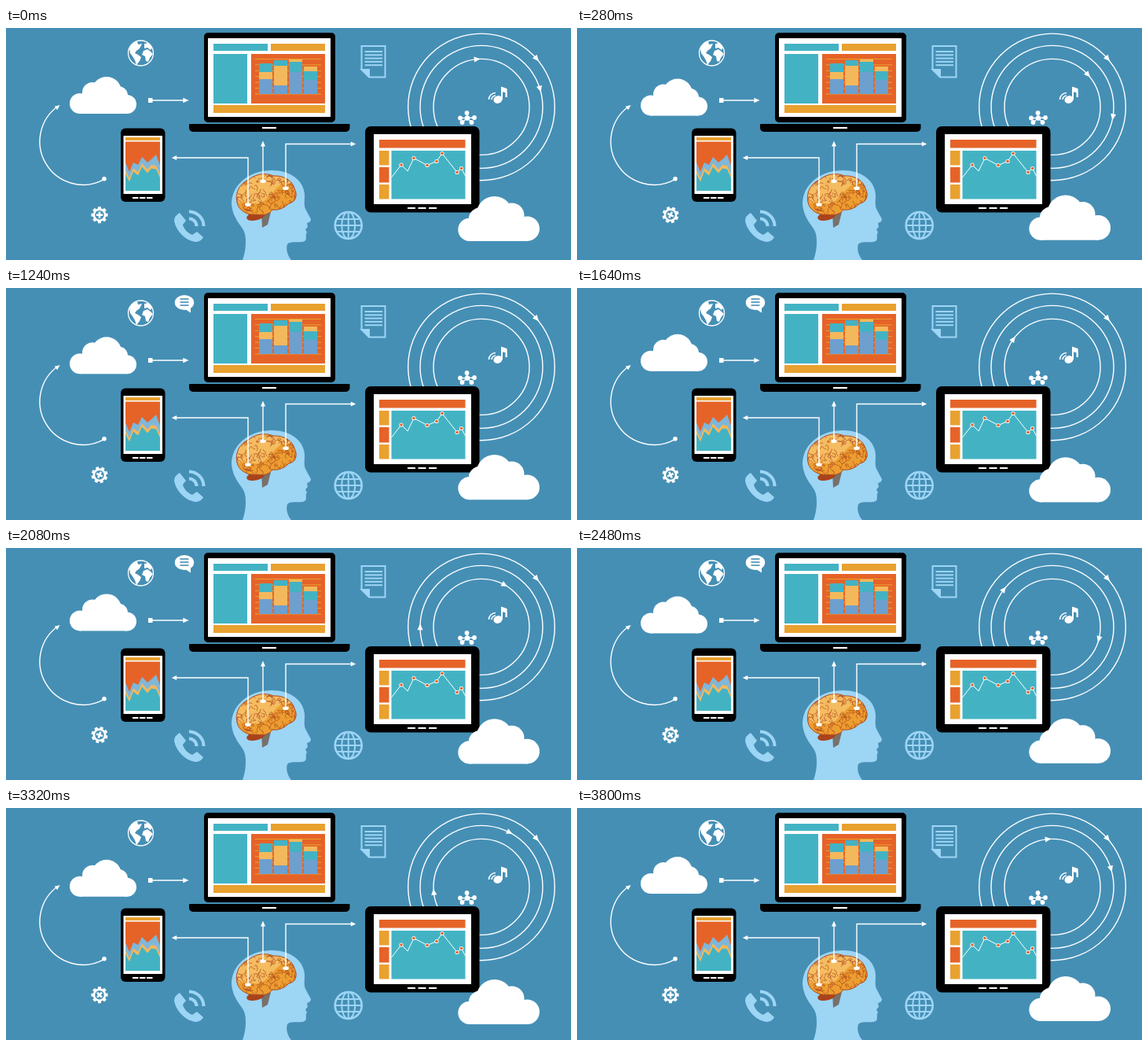
Write an HTML page with a canvas that moves like this. It is 719 px wide and 295 px high and loops after 3.84 s.

```html
<!DOCTYPE html>
<html lang="en">
<head>
<meta charset="utf-8">
<title>Connected devices</title>
<style>
html, body { margin: 0; width: 719px; height: 295px; overflow: hidden; background: #458fb5; }
canvas { display: block; }
</style>
</head>
<body>
<canvas id="stage" width="719" height="295"></canvas>
<script>
const ctx = document.getElementById('stage').getContext('2d');
const LOOP = 3840, TURN = 3800, TAU = Math.PI * 2;
const BG = '#458fb5', PALE = '#9dd5f5', TEAL = '#43b3c4', ORANGE = '#e66328',
  YELLOW = '#e9a12f', SAND = '#f3b85b', BLUE = '#6d9fcf', WHITE = '#fff', BLACK = '#000';

function box(color, x0, y0, x1, y1) {
  ctx.fillStyle = color;
  ctx.fillRect(x0, y0, x1 - x0, y1 - y0);
}
function roundBox(color, x0, y0, x1, y1, r) {
  ctx.fillStyle = color;
  ctx.beginPath();
  ctx.roundRect(x0, y0, x1 - x0, y1 - y0, r);
  ctx.fill();
}
function oval(color, x, y, rx, ry = rx, tilt = 0) {
  ctx.fillStyle = color;
  ctx.beginPath();
  ctx.ellipse(x, y, rx, ry, tilt, 0, TAU);
  ctx.fill();
}
function arc(color, width, x, y, r, a = 0, b = TAU) {
  ctx.strokeStyle = color;
  ctx.lineWidth = width;
  ctx.beginPath();
  ctx.arc(x, y, r, a, b);
  ctx.stroke();
}
function line(color, width, points) {
  ctx.strokeStyle = color;
  ctx.lineWidth = width;
  ctx.beginPath();
  points.forEach(p => ctx.lineTo(...p));
  ctx.stroke();
}
function poly(color, points) {
  ctx.fillStyle = color;
  ctx.beginPath();
  points.forEach(p => ctx.lineTo(...p));
  ctx.fill();
}
function shape(color, path) {
  ctx.fillStyle = color;
  ctx.fill(path);
}
// Triangle centred at x, y and pointing along the angle
function arrow(x, y, angle, size = 4) {
  ctx.save();
  ctx.translate(x, y);
  ctx.rotate(angle);
  poly(WHITE, [[size, 0], [-size, -size * .9], [-size, size * .9]]);
  ctx.restore();
}

function cloud(x, y, sx, sy) {
  ctx.save();
  ctx.translate(x, y);
  ctx.scale(sx, sy);
  oval(WHITE, 13, -13, 13);
  oval(WHITE, 29, -27, 13);
  oval(WHITE, 47, -28, 19);
  oval(WHITE, 62, -23, 12);
  oval(WHITE, 73, -12, 12);
  box(WHITE, 13, -22, 73, 0);
  ctx.restore();
}

function rings(turn) {
  const cx = 605, cy = 100.4;
  const ring = (r, degrees) => {
    const a = (degrees - 90) * Math.PI / 180;
    arc(WHITE, 1.4, cx, cy, r);
    arrow(cx + r * Math.cos(a), cy + r * Math.sin(a), a + Math.PI / 2);
  };
  ring(93.3, 49);
  ring(78, 73 + 360 * turn);
  ring(61, -5 + 720 * turn);
}

function laptop() {
  roundBox(BLACK, 252, 6, 419, 120, 5);
  box(WHITE, 257, 13, 413, 113);
  box(TEAL, 264, 20, 333, 29);
  box(YELLOW, 337, 20, 406, 29);
  box(TEAL, 264, 33, 307, 96);
  box(ORANGE, 312, 33, 406, 96);
  box(YELLOW, 264, 98, 406, 108);
  for (let i = 0; i < 7; i++) box(YELLOW, 317, 39 + i * 7.4, 401, 40 + i * 7.4);
  const bars = [
    [[TEAL, 45], [SAND, 56], [BLUE, 65]],
    [[TEAL, 41], [SAND, 48], [BLUE, 73]],
    [[SAND, 40], [TEAL, 43], [BLUE, 56]],
    [[SAND, 49], [TEAL, 55], [BLUE, 66]]
  ];
  bars.forEach((parts, i) => parts.forEach(([color, top]) =>
    box(color, 322 + i * 19, top, 339 + i * 19, 84)));
  roundBox(BLACK, 233, 122, 437.5, 132, [1, 1, 5, 5]);
  box(WHITE, 326, 126, 344, 128);
}

function phone() {
  roundBox(BLACK, 146, 127.5, 202.5, 221, 6);
  box(WHITE, 149.5, 137, 199, 211);
  box(YELLOW, 152, 139, 196, 143);
  box(ORANGE, 152, 144.5, 196, 207);
  const xs = [152, 157, 162, 168, 173, 180, 185, 191, 196];
  const area = (color, ys, dy = 0) => poly(color,
    [[152, 207], ...xs.map((x, i) => [x, ys[i] + dy]), [196, 207]]);
  const low = [181, 191, 178, 183, 172, 180, 174, 175, 186];
  area('#7fb7d9', [171, 183, 171, 174, 164, 171, 167, 161, 175]);
  area(SAND, low);
  area(TEAL, low, 4.5);
  for (const x of [161, 170, 179]) box(WHITE, x, 215, x + 7.5, 217);
}

function tablet() {
  roundBox(BLACK, 457, 125, 602.5, 234.5, 7);
  box(WHITE, 468, 135, 592, 224);
  box(ORANGE, 475, 142, 584.5, 152.5);
  box(YELLOW, 475, 156, 487.5, 174.5);
  box(ORANGE, 475, 177, 487.5, 196.5);
  box(YELLOW, 475, 199, 487.5, 217.5);
  box(TEAL, 490.5, 156, 584.5, 217.5);
  const data = [[490.5, 190], [503, 174], [511, 182], [519, 165.5], [536, 174.5],
    [548, 169.5], [555, 159.5], [574, 183.5], [579.5, 178.5], [584.5, 188]];
  line(WHITE, 1, data);
  data.forEach(([x, y], i) => {
    if (i % 9 === 0 || i === 2) return;
    oval(WHITE, x, y, 2.6);
    oval(ORANGE, x, y, 1.8);
  });
  for (const x of [511, 524.5, 538]) box(WHITE, x, 228, x + 10, 230);
}

const head = new Path2D(`M301 295 C305 284 306 272 304 262 C302 252 289 245 287 224
  C287 198 311 181 338 181 C362 181 379 194 380 212 C380 221 379 225 381 230
  L388 243 Q388 247 383 248 L384 253 L381 256 L383 260 C380 263 384 269 380 271
  C374 274 362 270 358 275 C356 281 358 289 363 295 Z`);
const brain = new Path2D(`M294 222 C291 209 298 197 309 193 C317 185 332 184 340 188
  C354 187 365 195 367 204 C372 213 368 222 360 223 C354 229 347 232 339 231
  C335 237 327 239 319 237 C308 239 296 232 294 222 Z`);
const lowerBrain = new Path2D(`M294 224 C305 216 316 228 327 221 C339 212 343 201 355 197
  L375 202 L370 224 L340 240 L300 240 Z`);

function makeFolds() {
  let seed = 17;
  const random = () => (seed = seed * 16807 % 2147483647) / 2147483647;
  const path = new Path2D();
  for (let i = 0; i < 120; i++) {
    let x = 294 + random() * 75, y = 187 + random() * 51, a = random() * TAU;
    path.moveTo(x, y);
    for (let k = 0; k < 3; k++) {
      a += (random() - .5) * 3.4;
      const mx = x + 2 * Math.cos(a), my = y + 2 * Math.sin(a);
      a += (random() - .5) * 3.4;
      x = mx + 2 * Math.cos(a);
      y = my + 2 * Math.sin(a);
      path.quadraticCurveTo(mx, my, x, y);
    }
  }
  return path;
}
const folds = makeFolds();

function headAndBrain() {
  shape(PALE, head);
  poly('#77716b', [[325, 236], [337, 234], [333, 250], [326, 254]]);
  oval('#a9431c', 318, 239, 12, 5.5, -.25);
  shape('#f5bc60', brain);
  ctx.save();
  ctx.clip(brain);
  shape('#ec9e30', lowerBrain);
  ctx.strokeStyle = '#b04a1d';
  ctx.lineWidth = .7;
  ctx.stroke(folds);
  ctx.restore();
  ctx.strokeStyle = '#b04a1d';
  ctx.lineWidth = 1;
  ctx.stroke(brain);
}

function connectors() {
  line(WHITE, 1.4, [[308, 225], [308, 165], [216, 165]]);
  arrow(214, 165, Math.PI, 3.2);
  line(WHITE, 1.4, [[327, 195], [327, 149]]);
  arrow(327, 147, -Math.PI / 2, 3.4);
  line(WHITE, 1.4, [[356, 204], [356, 147.5], [440, 147.5]]);
  arrow(442, 147.5, 0, 3.2);
  for (const [x, y] of [[308, 224.5], [327, 194.7], [356, 203.7]]) oval(WHITE, x, y, 3.8, 2.3);

  box(WHITE, 181, 89, 186.5, 95);
  line(WHITE, 1.4, [[184, 92], [227, 92]]);
  arrow(229, 92, 0, 3.6);
  arc(WHITE, 1.4, 98, 144.3, 55, 1.06, Math.PI + .96);
  oval(WHITE, 125, 191.7, 2.8);
  arrow(66, 100, -.65, 3.2);
}

const continents = new Path2D(`M157 26 L161 20 L167 17 L168 21 L173 20 L170 26 L166 29 L164 32
  L168 34 L172 37 L170 42 L166 47 L164 41 L161 36 L158 32 Z
  M176 20 L181 19 L186 25 L184 28 L180 25 L176 26 Z
  M175 29 L180 27 L184 30 L187 33 L183 38 L181 43 L178 42 L177 36 L173 34 Z`);
const handset = new Path2D(`M221 235 Q214 239 214 245 C216 258 229 271 242 272 Q249 271 251 266
  L243 259 L237 263 C231 261 226 255 225 250 L229 245 Z`);

function icons() {
  arc(WHITE, 1.3, 171.5, 32, 16);
  shape(WHITE, continents);

  shape(PALE, handset);
  arc(PALE, 4, 233, 252, 9.5, -Math.PI / 2, 0);
  arc(PALE, 4, 233, 252, 18.5, -Math.PI / 2, 0);

  // Wire globe
  arc(PALE, 2.6, 435.7, 251, 17);
  ctx.lineWidth = 2;
  ctx.beginPath();
  ctx.ellipse(435.7, 251, 8.5, 17, 0, 0, TAU);
  ctx.stroke();
  line(PALE, 2, [[435.7, 234], [435.7, 268]]);
  for (const [y, half] of [[243, 15], [251, 17], [259, 15]])
    line(PALE, 2, [[435.7 - half, y], [435.7 + half, y]]);

  // Document
  line(PALE, 2, [[452.5, 53], [452.5, 23], [482.5, 23], [482.5, 62.5], [462, 62.5], [452.5, 53], [462, 53], [462, 62.5]]);
  poly(PALE, [[452.5, 53], [462, 53], [462, 62.5]]);
  for (let i = 0; i < 5; i++) line(PALE, 2, [[456.5, 30 + i * 4.3], [479, 30 + i * 4.3]]);

  // Network hub
  for (const [x, y] of [[578, 114.5], [586.5, 108], [596, 114], [592.5, 120], [580.5, 120]]) {
    line(WHITE, 1.4, [[587, 114.5], [x, y]]);
    oval(WHITE, x, y, 2.9);
  }
  oval(WHITE, 587, 114.5, 3.2);

  // Music note
  oval(WHITE, 626, 91, 5.6, 4.8, -.3);
  line(WHITE, 2, [[631, 91], [631, 75]]);
  shape(WHITE, new Path2D('M630 74.5 L637.5 77 L638 88 L635.5 88 L635.5 82 L630 81 Z'));
  arc(WHITE, 1.6, 623, 91, 5, Math.PI, Math.PI * 1.5);
  arc(WHITE, 1.6, 623, 91, 8.5, Math.PI, Math.PI * 1.5);
}

function bubble() {
  oval(WHITE, 227, 18.5, 12.2, 9.6);
  poly(WHITE, [[228, 27], [235, 31.5], [235, 24]]);
  for (const y of [14, 18, 22]) line(BG, 1.6, [[221.5, y], [232.5, y]]);
}

function gear(angle) {
  ctx.save();
  ctx.translate(119, 237.7);
  ctx.rotate(angle);
  for (let i = 0; i < 8; i++) {
    ctx.rotate(TAU / 8);
    box(WHITE, -2, -10.5, 2, -6);
  }
  oval(WHITE, 0, 0, 8.4);
  oval(BG, 0, 0, 5.8);
  box(WHITE, -4.2, -1.3, 4.2, 1.3);
  box(WHITE, -1.3, -4.2, 1.3, 4.2);
  ctx.restore();
}

// Eased interpolation through [time, value] keys
function track(t, keys) {
  const i = Math.max(1, keys.findIndex(k => k[0] >= t));
  const [t0, v0] = keys[i - 1], [t1, v1] = keys[i];
  const p = (t - t0) / (t1 - t0);
  return v0 + (v1 - v0) * (1 - Math.cos(Math.PI * p)) / 2;
}
const rightCloudKeys = [[0, 0], [720, -4], [2150, 3.5], [2550, 2.7], [3120, 5], [3800, 0], [3840, 0]];

function draw(now) {
  const t = Math.floor(now % LOOP / 40) * 40;
  const turn = t / TURN;
  box(BG, 0, 0, 719, 295);
  rings(turn);
  icons();
  if (t >= 400 && t < 2920) bubble();
  gear(turn * TAU);
  cloud(81, 109 + 4 * Math.sin(turn * 1.5 * TAU), 1, 1);
  laptop();
  phone();
  tablet();
  cloud(679, 271 + track(t, rightCloudKeys), -1.22, 1.215);
  headAndBrain();
  connectors();
}

const start = performance.now();
function tick() {
  draw(performance.now() - start);
  requestAnimationFrame(tick);
}
tick();
</script>
</body>
</html>
```
